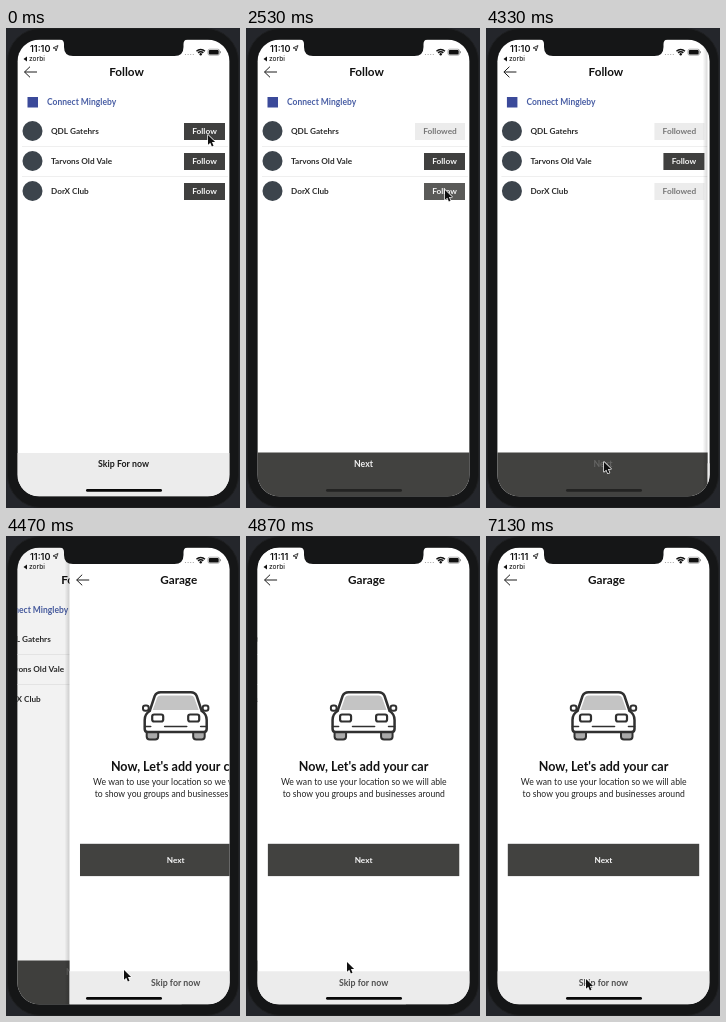
An HTML page with a canvas that plays this animation: 234 px wide and 480 px high, repeating every 8000 ms.

```html
<!DOCTYPE html>
<html lang="en">
<head>
<meta charset="utf-8">
<title>Follow and garage screens</title>
<style>
  html, body { margin: 0; width: 100%; height: 100%; overflow: hidden; background: #202226; }
  canvas { display: block; width: 234px; height: 480px; }
</style>
</head>
<body>
<canvas id="stage"></canvas>
<script>
const W = 234, H = 480, LOOP = 8000, FPS = 15;
const SCREEN = { x: 11.4, y: 11.6, w: 212.2, h: 456.8, r: 22 };
const DARK = '#424240', LIGHT = '#ececec', INK = '#1c1c1c';
const SANS = 'Lato, "Open Sans", sans-serif';

const canvas = document.getElementById('stage');
const ratio = window.devicePixelRatio || 1;
canvas.width = W * ratio;
canvas.height = H * ratio;
const ctx = canvas.getContext('2d');

const GROUPS = [
  { name: 'QDL Gatehrs', y: 103, press: 470, done: 730 },
  { name: 'Tarvons Old Vale', y: 133, press: Infinity, done: Infinity },
  { name: 'DorX Club', y: 163, press: 2530, done: 2730 }
];
const NEXT_PRESS = 4130, PUSH_START = 4330, PUSH_END = 4930, MINUTE_TICK = 4730;

// time, x, y of the pointer tip
const POINTER = [
  [0, 202, 107], [30, 202, 107], [270, 198, 113], [730, 198, 113],
  [1000, 197, 114], [1550, 197, 114], [2400, 199, 162], [2650, 199, 162],
  [3470, 135, 443], [3660, 128, 451], [3870, 118, 434], [4600, 118, 434],
  [4870, 101, 426], [4940, 101, 426], [5530, 156, 380], [5610, 156, 380],
  [6470, 104, 440], [6610, 104, 440], [7130, 100, 443], [LOOP, 100, 443]
];

function pointerAt(t) {
  const i = Math.max(1, POINTER.findIndex(k => k[0] >= t));
  const [t0, x0, y0] = POINTER[i - 1], [t1, x1, y1] = POINTER[i];
  const u = (t - t0) / (t1 - t0), e = u * u * (3 - 2 * u);
  return [x0 + (x1 - x0) * e, y0 + (y1 - y0) * e];
}

// Critically damped spring from 0 to 1
function pushAt(t) {
  if (t < PUSH_START) return 0;
  if (t >= PUSH_END) return 1;
  const s = 19.3 * (t - PUSH_START) / 1000;
  return 1 - (1 + s) * Math.exp(-s);
}

function rect(x, y, w, h, fill) {
  ctx.fillStyle = fill;
  ctx.fillRect(x, y, w, h);
}

// Full-width band of the page from y down to the screen's end
function band(y, fill) {
  rect(SCREEN.x, y, SCREEN.w, SCREEN.y + SCREEN.h - y, fill);
}

function round(x, y, w, h, r, fill) {
  ctx.beginPath();
  ctx.roundRect(x, y, w, h, r);
  if (fill) { ctx.fillStyle = fill; ctx.fill(); }
}

function disc(x, y, r, fill) {
  ctx.beginPath();
  ctx.arc(x, y, r, 0, Math.PI * 2);
  ctx.fillStyle = fill;
  ctx.fill();
}

// Text whose capitals are centred on y
function label(str, x, y, size, { weight = 700, color = INK, align = 'center', font = SANS } = {}) {
  ctx.font = `${weight} ${size}px ${font}`;
  ctx.fillStyle = color;
  ctx.textAlign = align;
  ctx.fillText(str, x, y + size * 0.36);
}

function line(points, color, width) {
  ctx.beginPath();
  points.forEach(p => ctx.lineTo(...p));
  ctx.strokeStyle = color;
  ctx.lineWidth = width;
  ctx.stroke();
}

function header(title) {
  line([[18.5, 44], [31, 44]], INK, 1);
  line([[24, 38.7], [18.5, 44], [24, 49.3]], INK, 1);
  label(title, 120.5, 44, 11.7, { color: '#111' });
}

function groupRow(group, t) {
  const { name, y, press, done } = group;
  disc(26.5, y, 10, '#3c444c');
  label(name, 45, y, 8.2, { align: 'left', color: '#2b2b2b' });
  if (t >= done) {
    rect(169, y - 8, 50, 17, LIGHT);
    label('Followed', 194, y, 8.3, { color: '#777' });
  } else {
    rect(178, y - 8, 41, 17, t >= press ? '#5a5a58' : '#40403f');
    label('Follow', 198.5, y, 8.3, { color: '#f4f4f4' });
  }
}

function followPage(t) {
  band(SCREEN.y, '#fff');
  header('Follow');
  rect(21.5, 69, 10.5, 10.5, '#3b4a9a');
  label('Connect Mingleby', 41, 74, 8.5, { align: 'left', color: '#4a5fa5' });
  rect(16, 118, 206, 0.7, '#e8e8e8');
  rect(16, 148, 206, 0.7, '#e8e8e8');
  GROUPS.forEach(g => groupRow(g, t));
  if (t < GROUPS[0].done) {
    band(425, LIGHT);
    label('Skip For now', 117.5, 436, 8.8);
  } else {
    band(424.5, DARK);
    ctx.globalAlpha = t < NEXT_PRESS ? 1 : Math.max(0.2, 1 - (t - NEXT_PRESS + 66) / 165);
    label('Next', 117.5, 436, 8.7, { color: '#f0f0f0' });
    ctx.globalAlpha = 1;
  }
}

function mirrored(draw) {
  for (const side of [-1, 1]) {
    ctx.save();
    ctx.scale(side, 1);
    draw();
    ctx.restore();
  }
}

// Front view around its vertical axis, roof at y = 0
function car() {
  const stroke = '#303030';
  ctx.save();
  ctx.translate(117.5, 156);
  ctx.strokeStyle = stroke;
  ctx.lineWidth = 2;
  ctx.lineJoin = ctx.lineCap = 'round';

  mirrored(() => {
    round(17.5, 36, 11.5, 11.5, 3, '#aaa');
    ctx.stroke();
    round(27, 13.5, 5.7, 5.2, 2.3, '#fff');
    ctx.stroke();
  });

  ctx.beginPath();
  ctx.moveTo(-26, 19);
  ctx.lineTo(-21, 4);
  ctx.quadraticCurveTo(-19.5, 0.5, -15, 0.3);
  ctx.lineTo(15, 0.3);
  ctx.quadraticCurveTo(19.5, 0.5, 21, 4);
  ctx.lineTo(26, 19);
  ctx.quadraticCurveTo(31, 22, 31, 28);
  ctx.lineTo(31, 37);
  ctx.quadraticCurveTo(31, 40, 28, 40);
  ctx.lineTo(-28, 40);
  ctx.quadraticCurveTo(-31, 40, -31, 37);
  ctx.lineTo(-31, 28);
  ctx.quadraticCurveTo(-31, 22, -26, 19);
  ctx.closePath();
  ctx.fillStyle = '#fff';
  ctx.fill();
  ctx.lineWidth = 2.5;
  ctx.stroke();

  ctx.beginPath();
  ctx.moveTo(-23, 18);
  ctx.lineTo(-18.5, 5.5);
  ctx.quadraticCurveTo(-17.5, 3.5, -15, 3.5);
  ctx.lineTo(15, 3.5);
  ctx.quadraticCurveTo(17.5, 3.5, 18.5, 5.5);
  ctx.lineTo(23, 18);
  ctx.closePath();
  ctx.fillStyle = '#c4c4c4';
  ctx.fill();

  mirrored(() => {
    round(12.5, 22.5, 11, 7, 2, '#fff');
    ctx.lineWidth = 2.2;
    ctx.stroke();
    line([[25, 34.5], [31, 34.5]], stroke, 1.6);
  });
  line([[-11, 34.5], [11, 34.5]], stroke, 1.6);
  ctx.restore();
}

function garagePage() {
  band(SCREEN.y, '#fff');
  header('Garage');
  car();
  label("Now, Let's add your car", 117.5, 230, 12.5, { color: '#111' });
  const body = { weight: 400, color: '#222' };
  label('We wan to use your location so we will able', 117.7, 246, 8.65, body);
  label('to show you groups and businesses around', 117.7, 257.5, 8.65, body);
  rect(21.8, 307.8, 191.4, 32.3, DARK);
  label('Next', 117.5, 324, 8.2, { color: '#f4f4f4' });
  band(435.3, LIGHT);
  label('Skip for now', 117.5, 447, 8.8, { color: '#505050' });
}

function pages(t) {
  const p = pushAt(t), offset = (1 - p) * SCREEN.w;
  if (p < 1) {
    ctx.save();
    ctx.translate(-0.3 * SCREEN.w * p, 0);
    followPage(t);
    ctx.restore();
    if (p > 0) band(SCREEN.y, `rgba(0,0,0,${0.07 * p})`);
  }
  if (p > 0) {
    if (p < 1) {
      const edge = SCREEN.x + offset;
      const shade = ctx.createLinearGradient(edge - 5, 0, edge, 0);
      shade.addColorStop(0, 'rgba(0,0,0,0)');
      shade.addColorStop(1, 'rgba(0,0,0,.16)');
      rect(edge - 5, SCREEN.y, 5, SCREEN.h, shade);
    }
    ctx.save();
    ctx.translate(offset, 0);
    garagePage();
    ctx.restore();
  }
}

function statusBar(t) {
  label(t < MINUTE_TICK ? '11:10' : '11:11', 24, 20.3, 9.1,
    { weight: 600, align: 'left', color: '#111', font: 'Inter, sans-serif' });
  label('zorbi', 23, 31, 6.6, { weight: 500, align: 'left', color: '#222', font: 'Inter, sans-serif' });
  ctx.fillStyle = '#111';
  ctx.beginPath();
  [[21, 28.5], [17.5, 31], [21, 33.5]].forEach(p => ctx.lineTo(...p));
  ctx.fill();
  ctx.beginPath();
  [[52, 17.5], [47, 20], [49.5, 20.5], [50, 23]].forEach(p => ctx.lineTo(...p));
  ctx.closePath();
  ctx.strokeStyle = '#111';
  ctx.lineWidth = 0.8;
  ctx.stroke();

  for (let i = 0; i < 4; i++) disc(179.5 + i * 2.6, 26.5, 0.6, '#999');
  ctx.lineWidth = 1.5;
  for (const r of [3.7, 6]) {
    ctx.beginPath();
    ctx.arc(194.7, 27.5, r, -Math.PI * 0.75, -Math.PI * 0.25);
    ctx.stroke();
  }
  disc(194.7, 26.3, 1.2, '#111');
  round(202, 21.2, 11.5, 6, 1.7);
  ctx.lineWidth = 0.6;
  ctx.strokeStyle = '#777';
  ctx.stroke();
  round(202.8, 22, 9.9, 4.4, 1, '#111');
  rect(214.1, 23.2, 0.8, 2, '#777');
}

function notch() {
  const l = 58, r = 177.5, top = 11, low = 28, c = 9;
  ctx.beginPath();
  ctx.moveTo(l - 4, top);
  ctx.quadraticCurveTo(l, 12, l, 16);
  ctx.lineTo(l, low - c);
  ctx.quadraticCurveTo(l, low, l + c, low);
  ctx.lineTo(r - c, low);
  ctx.quadraticCurveTo(r, low, r, low - c);
  ctx.lineTo(r, 16);
  ctx.quadraticCurveTo(r, 12, r + 4, top);
  ctx.fillStyle = '#151617';
  ctx.fill();
}

function pointer(x, y) {
  ctx.save();
  ctx.translate(x, y);
  ctx.scale(0.92, 0.92);
  ctx.beginPath();
  [[0, 0], [0, 10.6], [2.5, 8.3], [4.2, 12.4], [6, 11.6], [4.3, 7.7], [7.7, 7.5]]
    .forEach(p => ctx.lineTo(...p));
  ctx.closePath();
  ctx.lineJoin = 'round';
  ctx.lineWidth = 1.5;
  ctx.strokeStyle = '#fff';
  ctx.stroke();
  ctx.fillStyle = '#111';
  ctx.fill();
  ctx.restore();
}

function draw(t) {
  ctx.setTransform(ratio, 0, 0, ratio, 0, 0);
  rect(0, 0, W, H, '#24262b');
  round(1.5, 0.5, 231, 479, 33, '#151617');
  ctx.strokeStyle = '#1e1f20';
  ctx.lineWidth = 1;
  ctx.stroke();

  ctx.save();
  round(SCREEN.x, SCREEN.y, SCREEN.w, SCREEN.h, SCREEN.r);
  ctx.clip();
  pages(t);
  statusBar(t);
  const onDark = t >= GROUPS[0].done && pushAt(t) < 0.5;
  round(80, 461, 76, 2.8, 1.4, onDark ? '#232322' : '#080808');
  ctx.restore();

  notch();
  pointer(...pointerAt(t));
}

let shown = -1;
const start = performance.now();
function tick() {
  const t = (performance.now() - start) % LOOP;
  const step = Math.floor((t + 4) * FPS / 1000);
  if (step !== shown) {
    shown = step;
    draw(Math.min(step * 1000 / FPS + 4, LOOP));
  }
  requestAnimationFrame(tick);
}
tick();
</script>
</body>
</html>
```
